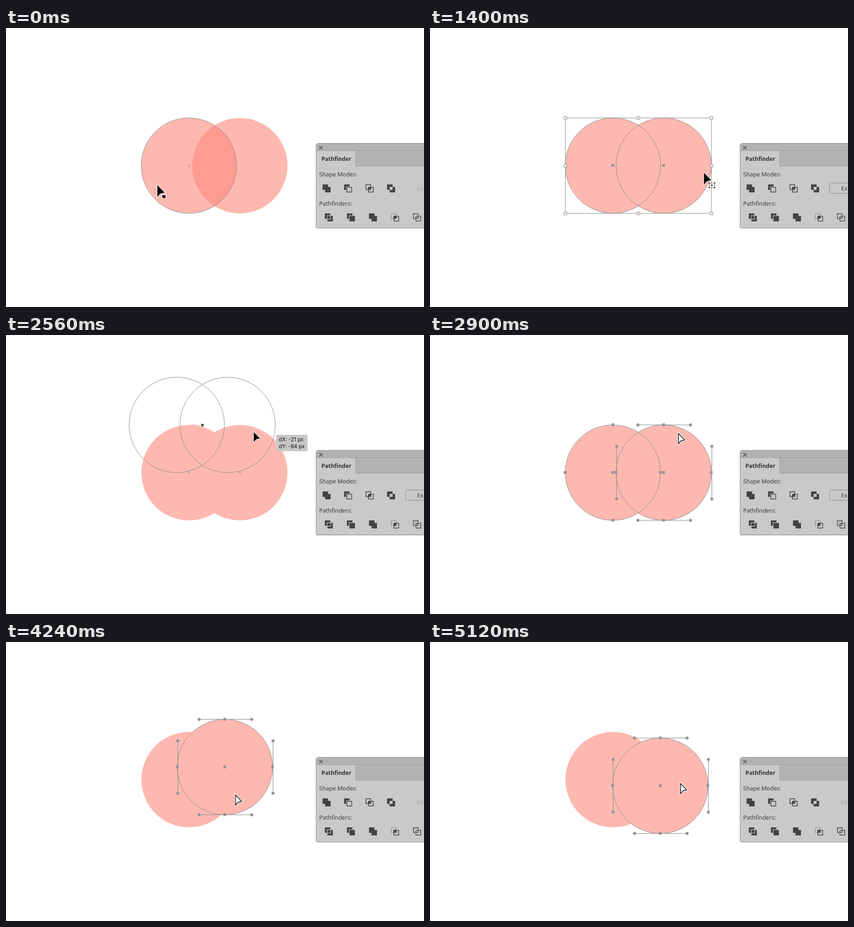
Recreate the animation shown at these times as an HTML page with a canvas. Size 917 by 611 pixels, loop 5500 ms.

```html
<!DOCTYPE html>
<html lang="en">
<head>
<meta charset="utf-8">
<title>Pathfinder</title>
<style>
html, body { margin: 0; width: 100%; height: 100%; overflow: hidden; background: #fff; }
canvas { display: block; }
</style>
</head>
<body>
<canvas id="stage" width="917" height="611"></canvas>
<script>
const ctx = document.getElementById('stage').getContext('2d');
const LOOP = 5500, STEP = 60, UNITE = 1120, R = 104.5, TAU = Math.PI * 2;
const PINK = '#feb8b0', DEEP = '#fe9c91', LINE = '#959595', EDGE = '#898989';
const BODY = '#c9c9c9', BAR = '#b2b2b2', INK = '#434343';
const LEFT = [401.5, 301.5], RIGHT = [513, 301.5];

const add = (p, q) => [p[0] + q[0], p[1] + q[1]];
const sub = (p, q) => [p[0] - q[0], p[1] - q[1]];
const mix = (p, q, k) => [p[0] + (q[0] - p[0]) * k, p[1] + (q[1] - p[1]) * k];
const curve = (p, c, q, k) => mix(mix(p, c, k), mix(c, q, k), k);

// Motion advances in short steps, as a screen recording does
function progress(t, [a, b]) {
  if (t < a) return 0;
  if (t >= b) return 1;
  return Math.min(1, (Math.floor((t - a) / STEP) + 1) * STEP / (b - a + STEP));
}

// Scenes: end time, pointer, what is marked on the artboard
const SCENES = [
  [200, 'square', 'hover left'], [480, 'arrow', 'box left'], [620, 'square', 'box left, hover right'],
  [1400, 'arrow', 'box both'], [1700, 'marquee', 'box both'], [2000, 'arrow', ''],
  [2400, 'square', 'hover right'], [2620, 'small', 'group drag'], [2900, 'arrow', 'box both'],
  [3000, 'direct', 'path both'], [3180, 'direct', ''], [3400, 'direct', 'hover right'],
  [LOOP, 'direct', 'path right']
];

// Drags: time span, bend and end of the path, grip relative to the centre,
// and when the pointer travels to the grip
const DRAGS = [
  { span: [3400, 3620], bend: [420, 62], to: [280.5, 274], grip: [26, 16], reach: [3000, 3240] },
  { span: [4000, 4240], bend: [380, 274], to: [480.5, 274], grip: [23, 61], reach: [3740, 3900] },
  { span: [4560, 4740], bend: [332, 322], to: [478.5, 349.5], grip: [44, -5], reach: [4340, 4500] },
  { span: [4900, 5120], bend: [515, 295], to: [505.5, 315], grip: [44, -5], reach: [4740, 4740] }
];
DRAGS.forEach((d, i) => d.from = i ? DRAGS[i - 1].to : RIGHT);

const GROUP = { span: [2400, 2560], move: [-26.5, -104.5], from: [570, 317] };

const MOVES = [
  { span: [280, 560], to: [562, 318] },
  { span: [620, 900], to: [702, 354] },
  { span: [1400, 1400], to: [601, 317] },
  { span: [1500, 1700], to: [630, 410] },
  { span: [1700, 1840], to: [581, 296] },
  { span: [2180, 2240], to: GROUP.from },
  { span: GROUP.span, to: add(GROUP.from, GROUP.move) },
  { span: [2900, 2900], to: [545, 216] },
  ...DRAGS.flatMap(d => [
    { span: d.reach, to: add(d.from, d.grip) },
    { span: d.span, bend: add(d.bend, d.grip), to: add(d.to, d.grip) }
  ])
];

function pointerAt(t) {
  let p = [332, 344];
  for (const m of MOVES) {
    const k = progress(t, m.span);
    if (k) p = curve(p, m.bend || mix(p, m.to, 0.5), m.to, k);
  }
  return p;
}

function rect(x, y, w, h, fill) {
  ctx.fillStyle = fill;
  ctx.fillRect(x, y, w, h);
}

function frame(x, y, w, h, color, width = 1) {
  ctx.strokeStyle = color;
  ctx.lineWidth = width;
  ctx.strokeRect(x, y, w, h);
}

function line(x1, y1, x2, y2, color, width = 1) {
  ctx.strokeStyle = color;
  ctx.lineWidth = width;
  ctx.beginPath();
  ctx.moveTo(x1, y1);
  ctx.lineTo(x2, y2);
  ctx.stroke();
}

function cross([x, y], r, color, width = 1) {
  line(x - r, y - r, x + r, y + r, color, width);
  line(x - r, y + r, x + r, y - r, color, width);
}

function text(str, x, y, font, color) {
  ctx.font = font;
  ctx.fillStyle = color;
  ctx.fillText(str, x, y);
}

function circle([x, y], r = R) {
  ctx.beginPath();
  ctx.arc(x, y, r, 0, TAU);
}

function disc(c, color, r) {
  circle(c, r);
  ctx.fillStyle = color;
  ctx.fill();
}

function outline(c) {
  circle(add(c, [-0.3, -0.1]));
  ctx.strokeStyle = EDGE;
  ctx.lineWidth = 1;
  ctx.stroke();
}

const anchor = ([x, y]) => rect(x - 3.5, y - 3.5, 6, 6, LINE);

function path(c) {
  outline(c);
  anchor(c);
  for (const s of [-R, R]) {
    anchor(add(c, [s, 0]));
    anchor(add(c, [0, s]));
  }
}

function handles(c) {
  const k = R * 0.5523, [x, y] = add(c, [0.8, -0.1]);
  const bar = (x1, y1, x2, y2) => {
    line(x1, y1, x2, y2, LINE, 1.3);
    disc([x1, y1], LINE, 3.3);
    disc([x2, y2], LINE, 3.3);
  };
  for (const s of [-R, R]) {
    bar(x - k, y + s, x + k, y + s);
    bar(x + s, y - k, x + s, y + k);
  }
}

function boundingBox(list) {
  const a = sub(list[0], [R, R]), b = add(list[list.length - 1], [R, R]);
  for (const c of list) {
    outline(c);
    anchor(c);
  }
  frame(...a, ...sub(b, a), LINE, 1.2);
  for (const i of [0, 0.5, 1]) for (const j of [0, 0.5, 1]) {
    if (i === 0.5 && j === 0.5) continue;
    const x = a[0] + (b[0] - a[0]) * i, y = a[1] + (b[1] - a[1]) * j;
    rect(x - 3, y - 3, 6, 6, '#fff');
    frame(x - 3, y - 3, 6, 6, LINE, 1.2);
  }
}

function hover(c) {
  outline(c);
  cross(c, 2.5, EDGE);
}

// Two overlapping squares, drawn in a different way for each command
function icon(x, y, kind) {
  const back = fill => rect(x, y, 12, 12, fill);
  const front = (fill, gap = 0) => rect(x + 5.5 - gap, y + 5.5 - gap, 12 + gap, 12 + gap, fill);
  const backFrame = color => frame(x + 0.75, y + 0.75, 10.5, 10.5, color, 1.5);
  const frontFrame = () => frame(x + 6.25, y + 6.25, 10.5, 10.5, INK, 1.5);
  const core = (size, fill) => rect(x + 8.75 - size / 2, y + 8.75 - size / 2, size, size, fill);
  const draw = {
    unite() { back(INK); front(INK); },
    minus() { back(INK); front(BODY, 1); frontFrame(); },
    intersect() { backFrame(INK); frontFrame(); core(4.5, INK); },
    exclude() { back(INK); front(INK); core(6.5, BODY); },
    divide() { back(INK); front(INK); frame(x + 5, y + 5, 7.5, 7.5, BODY, 1.2); },
    trim() { back(INK); front(BODY, 1.2); front(INK); },
    crop() { backFrame('#989898'); frontFrame(); core(6, INK); },
    outline() {
      backFrame(INK);
      frontFrame();
      core(7, BODY);
      circle([x + 8.75, y + 8.75], 2.6);
      ctx.stroke();
    }
  };
  draw[kind]();
}

function box(x, y, w, h, r, fill, stroke) {
  ctx.beginPath();
  ctx.roundRect(x, y, w, h, r);
  ctx.fillStyle = fill;
  ctx.fill();
  if (stroke) {
    ctx.strokeStyle = stroke;
    ctx.lineWidth = 1;
    ctx.stroke();
  }
}

function panel(enabled) {
  const plain = '12.6px "Noto Sans", "Open Sans", sans-serif';
  const corners = [5, 0, 0, 2];
  ctx.save();
  ctx.shadowColor = 'rgba(0,0,0,.3)';
  ctx.shadowBlur = 3;
  ctx.shadowOffsetY = 1;
  box(680.5, 252.5, 260, 185, corners, BODY);
  ctx.restore();
  ctx.save();
  ctx.clip();
  rect(680, 252, 240, 16, BAR);
  rect(767, 268, 150, 35, BAR);
  line(680, 268.5, 917, 268.5, '#999');
  line(767.5, 269, 767.5, 302, '#999');
  line(767, 302.5, 917, 302.5, '#999');
  ctx.restore();
  box(680.5, 252.5, 260, 185, corners, 'transparent', '#929292');

  cross([690.8, 262], 3.7, '#444', 1.4);
  text('Pathfinder', 692, 290.5, 'bold 12.25px "Noto Sans", "Open Sans", sans-serif', '#333');
  text('Shape Modes:', 687, 325, plain, '#3c3c3c');
  text('Pathfinders:', 687, 388.5, plain, '#3c3c3c');
  ['unite', 'minus', 'intersect', 'exclude'].forEach((k, i) => icon(694.5 + 47.2 * i, 342.5, k));
  ['divide', 'trim', 'unite', 'crop', 'outline'].forEach((k, i) => icon(699.5 + 48.4 * i, 406, k));
  if (enabled) box(876.5, 339.5, 80, 22.5, 3, BODY, '#8f8f8f');
  text('Ex', 902, 356, plain, enabled ? '#444' : '#a8a8a8');
}

function pointer([x, y], kind) {
  const light = kind === 'direct', k = light || kind === 'small' ? 0.85 : 1;
  ctx.save();
  ctx.translate(x, y);
  ctx.beginPath();
  for (const [px, py] of [[0, 0], [0, 26], [6.7, 18.5], [16, 16.5]]) ctx.lineTo(px * k, py * k);
  ctx.closePath();
  ctx.strokeStyle = '#fff';
  ctx.lineWidth = light ? 4 : 2;
  ctx.stroke();
  ctx.fillStyle = light ? '#fff' : '#000';
  ctx.fill();
  if (light) {
    ctx.strokeStyle = '#111';
    ctx.lineWidth = 1.6;
    ctx.stroke();
  }
  if (kind === 'square') {
    rect(9.5, 20.5, 10, 9, '#fff');
    rect(11, 22, 7, 6.5, '#000');
  }
  if (kind === 'marquee') {
    ctx.setLineDash([2, 1.6]);
    frame(11.5, 22.5, 12, 10, '#000', 1.2);
    for (const cx of [11.5, 23.5]) for (const cy of [22.5, 32.5]) rect(cx - 1.2, cy - 1.2, 2.4, 2.4, '#000');
    rect(16.3, 26.3, 2.4, 2.4, '#000');
  }
  ctx.restore();
}

function dragLabel([x, y], shift) {
  box(x + 49, y + 6, 69, 36, 3, '#c8c8c8');
  shift.forEach((v, i) => text(`d${'XY'[i]}: ${Math.round(v / 1.25)} px`, x + 55, y + 20 + 15 * i,
    '11.5px Inter, "Liberation Sans", sans-serif', '#111'));
}

function snapGuide() {
  line(408.5, 197.5, 431, 197.5, '#e9a69f');
  cross([408.5, 197.5], 2.7, '#f2a8a0');
  cross([431, 197.5], 2.8, '#000', 1.6);
}

function draw(t) {
  const [, tool, marks] = SCENES.find(s => t < s[0]);
  const has = mark => marks.includes(mark);
  const drag = DRAGS.find(d => t >= d.span[0] && t < d.span[1]);
  const grouped = has('group');
  const dropped = has('box both') && t > GROUP.span[1] ? GROUP.move : [0, 0];
  const rest = DRAGS.reduce((c, d) => t >= d.span[1] ? d.to : c, RIGHT);
  const left = add(LEFT, dropped), right = add(rest, dropped);
  const tip = pointerAt(t);

  rect(0, 0, 917, 611, '#fff');
  disc(left, PINK);
  disc(right, PINK);
  if (t < UNITE) {
    ctx.save();
    circle(left);
    ctx.clip();
    disc(right, DEEP);
    ctx.restore();
  }

  if (has('box left')) boundingBox([left]);
  if (has('box both')) boundingBox([left, right]);
  if (has('hover left')) hover(left);
  if (has('hover right')) hover(right);
  if (has('path both')) path(left);
  if (has('path') && !drag) {
    path(right);
    handles(right);
  }

  let shift;
  if (drag) shift = sub(sub(tip, drag.grip), right);
  if (grouped) shift = sub(tip, GROUP.from);
  if (shift) {
    for (const c of grouped ? [left, right] : [right]) {
      cross(c, 2.5, EDGE);
      outline(add(c, shift));
    }
    if (grouped && t >= GROUP.span[1]) snapGuide();
  }

  panel(t >= UNITE && (has('both') || grouped));
  if (shift) dragLabel(tip, shift);
  pointer(tip, drag ? 'small' : tool);
}

const start = performance.now();

function loop(now) {
  draw(Math.max(0, now - start) % LOOP);
  requestAnimationFrame(loop);
}
draw(0);
requestAnimationFrame(loop);
</script>
</body>
</html>
```
